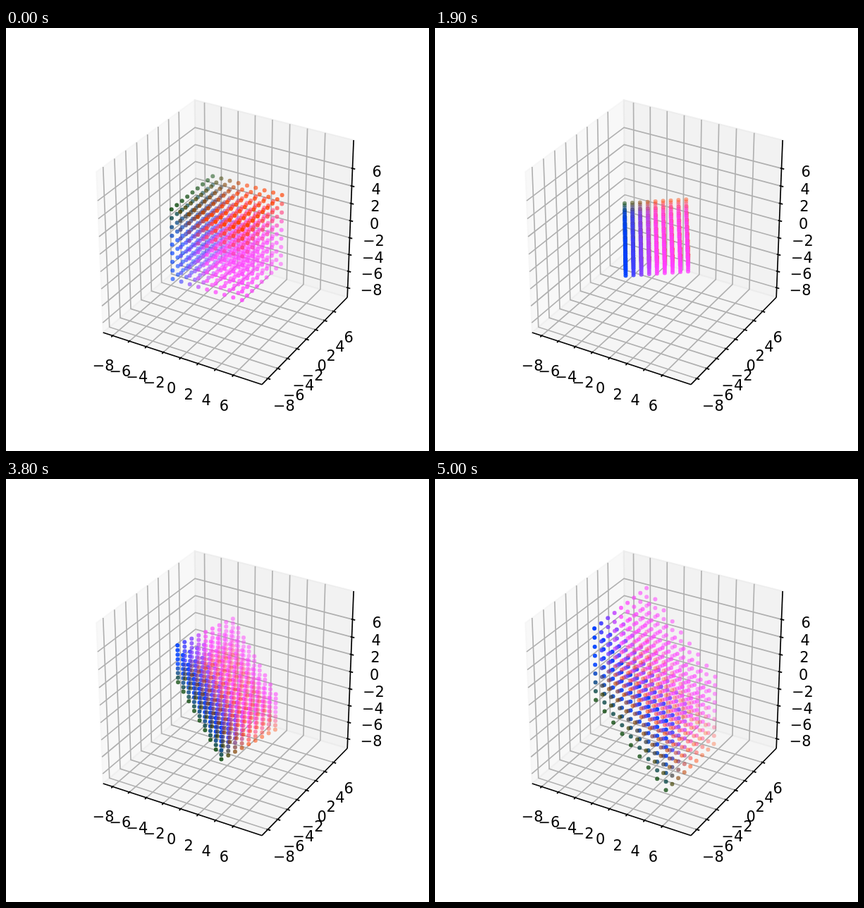
Recreate the animation shown at these times as an HTML page. Size 600x600 px, loop 5.1 s.

```html
<!DOCTYPE html>
<html lang="en">
<head>
<meta charset="utf-8">
<title>Linear map of a point lattice</title>
<style>
html, body { margin: 0; width: 100%; height: 100%; overflow: hidden; background: #fff; }
svg { display: block; width: 600px; height: 600px; }
text { font: 20.83px "DejaVu Sans", sans-serif; text-anchor: middle; fill: #000; }
</style>
</head>
<body>
<svg id="stage" viewBox="0 0 600 600"></svg>
<script>
const stage = document.getElementById('stage');
const STEP = 100, FRAMES = 51;
const SPAN = 17.6;            // data units across the unit cube
const EDGE = 25 / 48;         // half size of the padded box
const DELTA = 1 / 12;
const PAD = 0.10372;          // label distance from the box
const R3 = Math.sqrt(3) / 2;

function add(tag, attrs, text) {
  const el = document.createElementNS('http://www.w3.org/2000/svg', tag);
  for (const k in attrs) el.setAttribute(k, attrs[k]);
  if (text) el.textContent = text;
  stage.appendChild(el);
  return el;
}

// Perspective camera: elevation 30, azimuth -60, distance 10
function project([x, y, z]) {
  const right = R3 * x + y / 2;
  const up = -x / 4 + R3 / 2 * y + R3 * z;
  const w = 10 - (R3 / 2 * x - 0.75 * y + z / 2);
  const k = 462 / 0.185 / w;
  return [313.74 + right * k, 296.76 - up * k, w];
}

const path = pts => pts.map(p => project(p).slice(0, 2).map(v => v.toFixed(2)).join()).join(' ');

function line(pts, color, width) {
  add('polyline', { points: path(pts), fill: 'none', stroke: color, 'stroke-width': width });
}

function pane(pts, color) {
  add('polygon', { points: path(pts), fill: color, stroke: color,
    'fill-opacity': 0.5, 'stroke-opacity': 0.5, 'stroke-width': 2.08 });
}

function axis(ends, grid, tick, label) {
  line(ends, '#000', 1.67);
  const values = [-8, -6, -4, -2, 0, 2, 4, 6];
  for (const v of values) line(grid(v / SPAN), '#b0b0b0', 1.67);
  for (const v of values) {
    const u = v / SPAN;
    line([tick(u, -0.1 * DELTA), tick(u, 0.2 * DELTA)], '#000', 1.8);
    const [x, y] = project(label(u));
    add('text', { x: x.toFixed(2), y: Math.round(y + 15.8) }, String(v).replace('-', '\u2212'));
  }
}

const E = EDGE, L = EDGE + PAD;
pane([[-E, -E, -E], [-E, E, -E], [-E, E, E], [-E, -E, E]], '#f2f2f2');
pane([[-E, E, -E], [E, E, -E], [E, E, E], [-E, E, E]], '#e6e6e6');
pane([[-E, -E, -E], [E, -E, -E], [E, E, -E], [-E, E, -E]], '#ececec');

axis([[-E, -E, -E], [E, -E, -E]],
  u => [[u, -E, -E], [u, E, -E], [u, E, E]],
  (u, d) => [u, -E - d, -E],
  u => [u, -L, -L]);
axis([[E, -E, -E], [E, E, -E]],
  u => [[E, u, -E], [-E, u, -E], [-E, u, E]],
  (u, d) => [E + d, u, -E],
  u => [L, u, -L]);
axis([[E, E, -E], [E, E, E]],
  u => [[-E, -E, u], [-E, E, u], [E, E, u]],
  (u, d) => [E + d, E, u],
  u => [L, L, u]);

const dots = [];
const shade = v => Math.round(255 * Math.min(1, 1 + v / 4));
for (let x = -4; x <= 4; x++)
  for (let y = -4; y <= 4; y++)
    for (let z = -4; z <= 4; z++)
      dots.push({ x, y, z, el: add('circle', { r: 3, fill: `rgb(${shade(x)},64,${shade(-z)})` }) });

// Blend from the identity to the map (x, y, z) -> (-y, 1.25x, y - z)
function warp({ x, y, z }, s) {
  const mix = (a, b) => (a + (b - a) * s) / SPAN;
  return [mix(x, -y), mix(y, 1.25 * x), mix(z, y - z)];
}

function draw(frame) {
  const s = frame / (FRAMES - 1);
  const pts = dots.map(d => project(warp(d, s)));
  const depth = pts.map(p => -1 / p[2]);
  const near = Math.min(...depth), far = Math.max(...depth);
  dots.forEach(({ el }, i) => {
    el.setAttribute('cx', pts[i][0].toFixed(2));
    el.setAttribute('cy', pts[i][1].toFixed(2));
    el.setAttribute('fill-opacity', (1 - 0.7 * (depth[i] - near) / (far - near)).toFixed(3));
  });
}

let shown = 0;
const start = performance.now();
function tick(now) {
  const frame = Math.floor(Math.max(0, now - start) / STEP) % FRAMES;
  if (frame !== shown) draw(shown = frame);
  requestAnimationFrame(tick);
}
draw(0);
requestAnimationFrame(tick);
</script>
</body>
</html>
```
